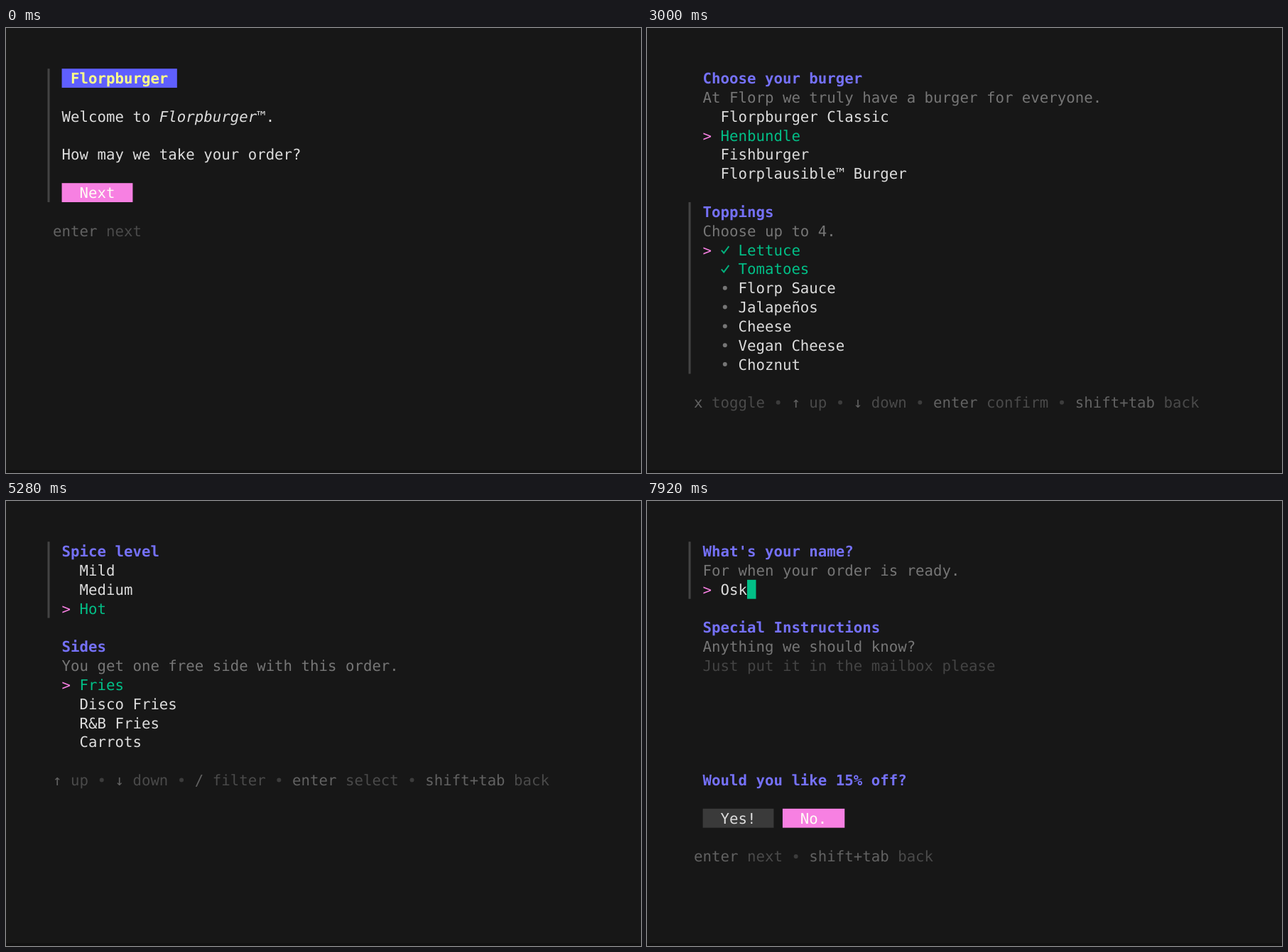
These frames come from a looping animation (894x626 px, 8000 ms). An HTML page with a canvas:

```html
<!DOCTYPE html>
<html lang="en">
<head>
<meta charset="utf-8">
<title>Burger order form</title>
<style>
  html, body { margin: 0; width: 100%; height: 100%; overflow: hidden; background: #171717; }
  canvas { display: block; }
</style>
</head>
<body>
<canvas id="stage" width="894" height="626"></canvas>
<script>
const LOOP = 8000;
const CELL = 12.48, ROW = 26.83, LEFT = 66.1, TOP = 57.2, BASELINE = 20.9;
const FONT = '20.7px "DejaVu Sans Mono", "Noto Sans Mono", monospace';
const C = {
  back: '#171717', edge: '#111111', text: '#dddddd', dim: '#767676', bar: '#444444',
  indigo: '#7571f9', pink: '#f780e2', green: '#02bf87', check: '#02b07c', red: '#ed567a',
  cream: '#fffdf5', label: '#5f5fff', yellow: '#ffff87', button: '#3a3a3a',
  key: '#626262', hint: '#4a4a4a', separator: '#3c3c3c'
};
const ctx = document.getElementById('stage').getContext('2d');
ctx.textAlign = 'center';
ctx.textRendering = 'geometricPrecision';

const colX = col => LEFT + col * CELL;
const rowY = row => TOP + row * ROW;

function fillCells(col, row, count, color) {
  ctx.fillStyle = color;
  ctx.fillRect(colX(col), rowY(row), count * CELL, ROW);
}

function drawBullet(x, y) {
  ctx.beginPath();
  ctx.arc(x, y, 3, 0, Math.PI * 2);
  ctx.fill();
}

function drawCheck(x, y) {
  ctx.lineWidth = 2;
  ctx.beginPath();
  ctx.moveTo(x - 5, y + 0.5);
  ctx.lineTo(x - 1.6, y + 4.5);
  ctx.lineTo(x + 5.5, y - 5);
  ctx.stroke();
}

// Writes one character per terminal cell and returns the next free column.
function write(col, row, text, color, style = '') {
  ctx.font = `${style} ${FONT}`;
  ctx.fillStyle = ctx.strokeStyle = color;
  for (const char of text) {
    const x = colX(col + 0.5), y = rowY(row);
    if (char === '•') drawBullet(x, y + ROW / 2);
    else if (char === '✓') drawCheck(x, y + ROW / 2);
    else ctx.fillText(char, x, y + BASELINE + (char === '*' ? 4 : 0));
    col++;
  }
  return col;
}

const title = (row, text) => write(1, row, text, C.indigo, 'bold');
const note = (row, text) => write(1, row, text, C.dim);
const pointer = row => write(1, row, '>', C.pink);

function focusBar(row, rows) {
  ctx.fillStyle = C.bar;
  ctx.fillRect(58.5, rowY(row), 3, rows * ROW);
}

function button(col, row, text, active) {
  fillCells(col, row, text.length + 4, active ? C.pink : C.button);
  write(col + 2, row, text, active ? C.cream : C.text);
}

function help(row, entries) {
  let col = 0;
  entries.split(' • ').forEach((entry, i) => {
    const [key, hint] = entry.split(' ');
    if (i) col = write(col, row, ' • ', C.separator);
    col = write(col, row, key + ' ', C.key);
    col = write(col, row, hint, C.hint);
  });
}

function select(row, options, chosen) {
  options.forEach((option, i) => write(3, row + i, option, i === chosen ? C.green : C.text));
  pointer(row + chosen);
}

function multiSelect(row, options, current, checked) {
  options.forEach((option, i) => {
    const on = checked.includes(i);
    write(3, row + i, on ? '✓' : '•', on ? C.check : C.dim);
    write(5, row + i, option, on ? C.green : C.text);
  });
  pointer(row + current);
}

// Picks the last [start, value] step that has begun.
const at = (t, steps) => steps.filter(([start]) => t >= start).pop()[1];

const SELECT_HELP = '↑ up • ↓ down • / filter • enter select • shift+tab back';
const TOGGLE_HELP = 'x toggle • ↑ up • ↓ down • enter confirm • shift+tab back';

function welcomePage() {
  focusBar(0, 7);
  fillCells(1, 0, 13, C.label);
  write(2, 0, 'Florpburger', C.yellow, 'bold');
  let col = write(1, 2, 'Welcome to ', C.text);
  col = write(col, 2, 'Florpburger™', C.text, 'italic');
  write(col, 2, '.', C.text);
  write(1, 4, 'How may we take your order?', C.text);
  button(1, 6, 'Next', true);
  help(8, 'enter next');
}

function burgerPage(t) {
  const onToppings = t >= 3000, refused = t >= 1720 && t < 2440;
  onToppings ? focusBar(7, 9) : focusBar(0, 6);

  const titleEnd = title(0, 'Choose your burger');
  if (refused) write(titleEnd + 1, 0, '*', C.red);
  note(1, 'At Florp we truly have a burger for everyone.');
  select(2, ['Florpburger Classic', 'Henbundle', 'Fishburger', 'Florplausible™ Burger'],
    at(t, [[0, 0], [1280, 1], [1320, 2], [2440, 1]]));

  title(7, 'Toppings');
  note(8, 'Choose up to 4.');
  multiSelect(9,
    ['Lettuce', 'Tomatoes', 'Florp Sauce', 'Jalapeños', 'Cheese', 'Vegan Cheese', 'Choznut'],
    at(t, [[0, 0], [3360, 1], [3560, 2], [3760, 3]]),
    t >= 4120 ? [0, 1, 3] : [0, 1]);

  if (refused) write(0, 17, '* no fish today, sorry', C.red);
  else help(17, onToppings ? TOGGLE_HELP : SELECT_HELP);
}

function sidesPage(t) {
  t >= 5880 ? focusBar(5, 5) : focusBar(0, 4);
  title(0, 'Spice level');
  select(1, ['Mild', 'Medium', 'Hot'], at(t, [[0, 0], [5080, 1], [5280, 2]]));
  title(5, 'Sides');
  note(6, 'You get one free side with this order.');
  select(7, ['Fries', 'Disco Fries', 'R&B Fries', 'Carrots'], at(t, [[0, 0], [6480, 1]]));
  help(12, SELECT_HELP);
}

function namePage(t) {
  focusBar(0, 3);
  title(0, "What's your name?");
  note(1, 'For when your order is ready.');
  pointer(2);
  const typed = at(t, [[0, ''], [7880, 'Os'], [7920, 'Osk']]);
  const cursor = write(3, 2, typed, C.text);
  fillCells(cursor, 2, 1, C.green);
  if (!typed) {
    const placeholder = 'Wilhelma Troskett';
    write(3, 2, placeholder[0], C.back);
    write(4, 2, placeholder.slice(1), C.bar);
  }

  title(4, 'Special Instructions');
  note(5, 'Anything we should know?');
  write(1, 6, 'Just put it in the mailbox please', C.bar);

  title(12, 'Would you like 15% off?');
  button(1, 14, 'Yes!', false);
  button(10, 14, 'No.', true);
  help(16, 'enter next • shift+tab back');
}

function draw(t) {
  ctx.fillStyle = C.back;
  ctx.fillRect(0, 0, 894, 626);
  ctx.fillStyle = C.edge;
  ctx.fillRect(0, 622, 894, 4);
  at(t, [[0, welcomePage], [680, burgerPage], [4680, sidesPage], [7080, namePage]])(t);
}

const start = performance.now();
function tick() {
  draw((performance.now() - start) % LOOP);
  requestAnimationFrame(tick);
}
tick();
</script>
</body>
</html>
```
